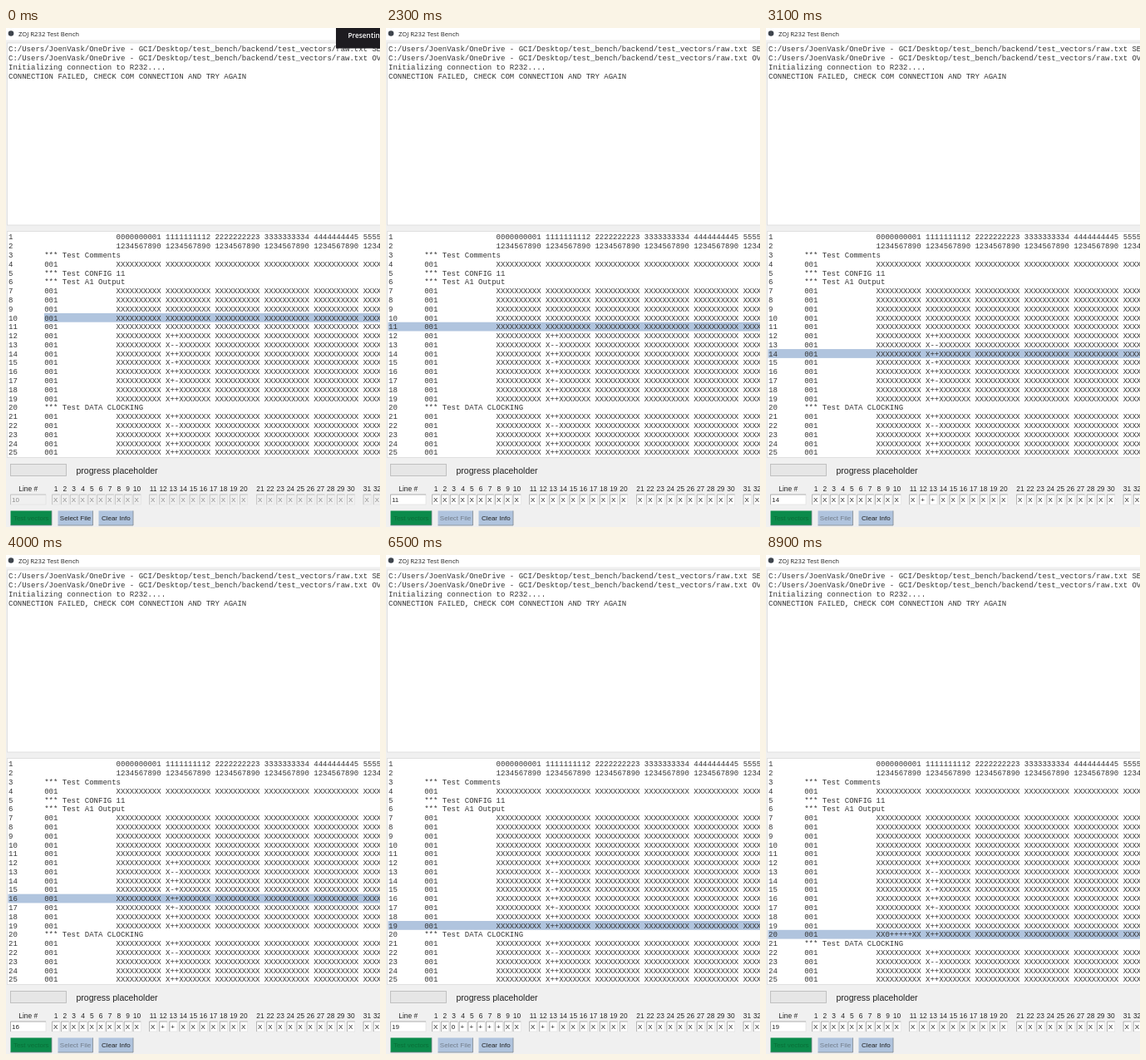
These frames come from a looping animation (450x600 px, 9000 ms). An HTML page:

```html
<!DOCTYPE html>
<html lang="en">
<head>
<meta charset="utf-8">
<title>Test Bench</title>
<style>
  html, body { margin: 0; width: 100%; height: 100%; overflow: hidden; background: #f0f0f0; }
  svg { display: block; width: 450px; height: 600px; }
  text { white-space: pre; font: 8px "Liberation Sans", Arial, sans-serif; fill: #222; }
  .mono { font: 9px "Liberation Mono", "Courier New", monospace; fill: #333; }
  .title { font: 7.7px "Open Sans", sans-serif; }
  .share { font: 600 8.3px "Open Sans", sans-serif; fill: #fff; }
  .big { font-size: 10.5px; }
  .label { font-size: 8.4px; }
  .mid { text-anchor: middle; }
</style>
</head>
<body>
<svg id="stage" viewBox="0 0 450 600"></svg>
<script>
const LOOP = 9000;
const PITCH = 10.79;
const X10 = 'X'.repeat(10);
const BLUE = '#b0c4de';

// Each step overrides the one before it.
const steps = [
  { at: 0, line: 10, row: 10, sharing: true, enabled: false, bits: X10, caret: 0, inserted: false },
  { at: 1300, sharing: false },
  { at: 1800, enabled: true },
  { at: 2300, line: 11, row: 11 },
  { at: 2800, line: 14, row: 14 },
  { at: 3800, line: 16, row: 16 },
  { at: 4300, line: 19, row: 19 },
  { at: 4800, bits: 'XX0XXXXXXX', caret: 4 },
  { at: 5300, bits: 'XX0++XXXXX', caret: 6 },
  { at: 5800, bits: 'XX0++++XXX', caret: 8 },
  { at: 6300, bits: 'XX0+++++XX', caret: 0 },
  { at: 6800, row: 20, bits: X10, inserted: true }
];
let last = {};
const states = steps.map(s => (last = { ...last, ...s }));

const path = 'C:/Users/JoenVask/OneDrive - GCI/Desktop/test_bench/backend/test_vectors/raw.txt ';
const log = [
  path + 'SELECTED',
  path + 'OVERWRITE',
  'Initializing connection to R232....',
  'CONNECTION FAILED, CHECK COM CONNECTION AND TRY AGAIN'
];

const groups = f => [0, 1, 2, 3, 4, 5].map(f).join(' ');
const vector = (pins = 'XXX', first = X10) =>
  '001'.padEnd(16) + groups(g => g === 0 ? first : g === 1 ? pins + 'X'.repeat(7) : X10);
const note = s => '*** Test ' + s;
const pinRows = list => list.split(' ').map(p => vector(p));

const baseRows = [
  ' '.repeat(16) + groups(g => String(g).repeat(9) + (g + 1)),
  ' '.repeat(16) + groups(() => '1234567890'),
  note('Comments'), vector(), note('CONFIG 11'), note('A1 Output'),
  ...pinRows('XXX XXX XXX XXX XXX X++ X-- X++ X-+ X++ X+- X++ X++'),
  note('DATA CLOCKING'),
  ...pinRows('X++ X-- X++ X++ X++')
];
const newRows = [...baseRows];
newRows.splice(19, 0, vector('X++', 'XX0+++++XX'));
newRows.length = 25;

const rect = (x, y, w, h, fill, extra = '') =>
  `<rect x="${x}" y="${y}" width="${w}" height="${h}" fill="${fill}" ${extra}/>`;
const text = (x, y, s, cls = '', fill = '') =>
  `<text x="${x}" y="${y}" class="${cls}"${fill && ` style="fill:${fill}"`}>${s}</text>`;

function panel(y, h) {
  return rect(1.5, y, 460, h, '#fff', 'stroke="#dadada" stroke-width=".8"');
}

function entry(x, w, s, on) {
  const edge = on ? '#a4a4a4' : '#bdbdbd';
  return rect(x, 561, w, 12, on ? '#fff' : '#f0f0f0', 'stroke="#e0e0e0" stroke-width=".7"') +
    `<path d="M${x} 573V561h${w}" fill="none" stroke="${edge}" stroke-width=".8"/>` +
    text(x + 1.5, 570.2, s, '', on ? '' : '#8a8a8a');
}

function button(x, w, s, fill, ink) {
  return rect(x, 580.5, w, 17.5, fill) +
    `<path d="M${x} 598h${w}V580.5" fill="none" stroke="#808890" stroke-width=".8"/>` +
    text(x + w / 2, 592, s, 'mid', ink);
}

function fields(s, pins) {
  let out = '';
  for (let i = 0; i < 32; i++) {
    const g = Math.floor(i / 10), k = i % 10;
    const mid = [60, 177, 306, 434.5][g] + k * (g ? 12.1 : 10.83);
    const bit = g === 0 ? s.bits[k] : g === 1 ? (pins[k] || 'X') : 'X';
    out += text(mid, 557, i + 1, 'label mid') + entry(mid - 4.4, 9.2, bit, s.enabled);
    if (s.caret === i + 1) out += rect(mid + 2.6, 562, 1.2, 10, '#000');
  }
  return out;
}

function draw(s) {
  const rows = s.inserted ? newRows : baseRows;
  const pins = s.line > 11 && !s.inserted ? 'X++' : '';
  const markX = s.enabled ? 2.5 : 46;
  return rect(0, 0, 450, 600, '#f0f0f0') +
    rect(0, 0, 450, 14.5, '#fff') +
    '<circle cx="6" cy="6.5" r="3.3" fill="#3d434b"/>' +
    text(15, 9.5, 'ZOJ R232 Test Bench', 'title') +
    panel(18, 219) +
    log.map((l, i) => text(3, 28.2 + i * PITCH, l, 'mono')).join('') +
    panel(244.5, 272) +
    rect(markX, 245.8 + (s.row - 1) * PITCH, 450 - markX, PITCH, BLUE) +
    rows.map((r, i) => text(3, 254.4 + i * PITCH, String(i + 1).padEnd(8) + r, 'mono')).join('') +
    rect(5.5, 524.5, 67, 14, '#e6e6e6', 'stroke="#bcbcbc" stroke-width=".9"') +
    text(84.5, 535.5, 'progress placeholder', 'big') +
    text(15.3, 557, 'Line #', 'label') +
    entry(5.5, 42.5, s.line, s.enabled) +
    fields(s, pins) +
    button(5.5, 49.5, 'Test vectors', '#0b8b4b', '#0a6f38') +
    button(62.5, 42, 'Select File', BLUE, s.enabled ? '#727c89' : '#222') +
    button(111.5, 41.5, 'Clear Info', BLUE, '#222') +
    (s.sharing ? rect(397, 0, 53, 24.5, '#1d1b20') + text(411.5, 12, 'Presenting', 'share') : '');
}

const stage = document.getElementById('stage');
const start = performance.now();
let shown = null;

function tick() {
  const t = (performance.now() - start) % LOOP;
  const state = states.filter(s => s.at <= t).pop();
  if (state !== shown) {
    stage.innerHTML = draw(state);
    shown = state;
  }
  requestAnimationFrame(tick);
}
tick();
</script>
</body>
</html>
```
